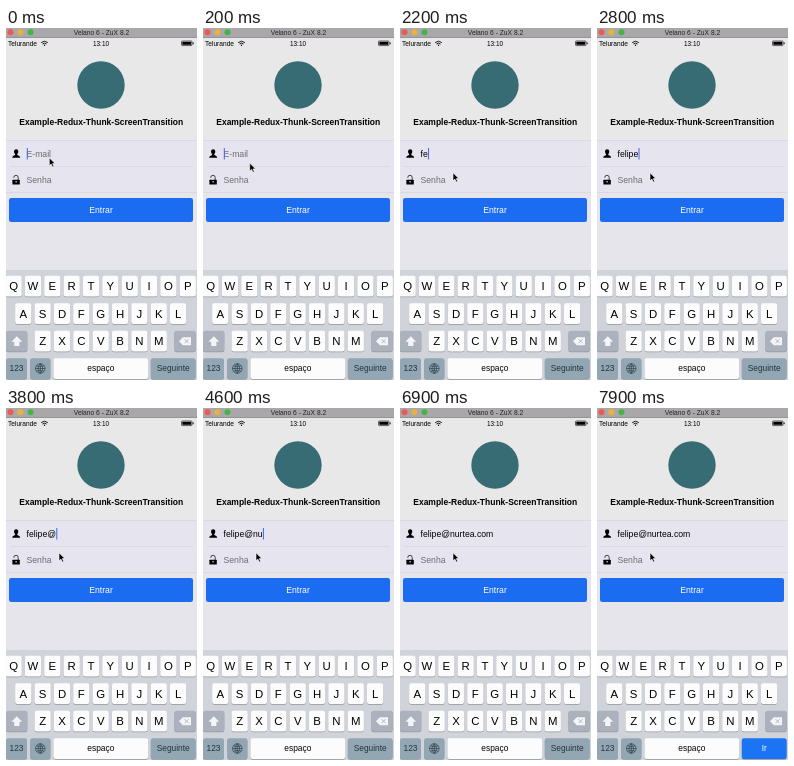
An HTML page for the animation above (8 s loop, 191 by 352 pixels).

```html
<!DOCTYPE html>
<html lang="pt-BR">
<head>
<meta charset="utf-8">
<title>Login</title>
<style>
  html, body { margin: 0; width: 100%; height: 100%; overflow: hidden; background: #e6e5ec; }
  svg { display: block; width: 191px; height: 352px; }
  text { font-family: "Liberation Sans", Arial, sans-serif; font-size: 8.66px; white-space: pre; }
  .mid { text-anchor: middle; }
  .bold { font-weight: bold; }
  .hint { fill: #6c6c70; }
  .key { font-size: 11.4px; }
  .label { font-size: 8.4px; }
</style>
</head>
<body>
<svg viewBox="0 0 191 352">
  <rect width="191" height="352" fill="#e6e5ec"/>
  <rect width="191" height="112" fill="#e8e8e8"/>

  <g id="titlebar">
    <rect width="191" height="10" fill="#aaa7ab"/>
    <rect y="9" width="191" height="1" fill="#969398"/>
    <circle cx="4.5" cy="4.2" r="3" fill="#ee5a52"/>
    <circle cx="14.3" cy="4.2" r="3" fill="#e9b23c"/>
    <circle cx="24.5" cy="4.2" r="3" fill="#43b548"/>
    <text class="mid" x="95.5" y="6.8" style="font-size:6.7px" fill="#252327">Velano 6 - ZuX 8.2</text>
  </g>

  <g id="status">
    <text x="2" y="17.6" style="font-size:6.6px">Telurande</text>
    <g fill="none" stroke="#000" stroke-width=".9">
      <path d="M35.2 14.6q3.3-2.8 6.6 0M36.5 16q2-1.7 4 0"/>
    </g>
    <circle cx="38.5" cy="17.2" r=".7"/>
    <text class="mid" x="95" y="17.6" style="font-size:6.4px">13:10</text>
    <rect x="175.5" y="13" width="10.5" height="4.6" rx=".8" fill="none" stroke="#000" stroke-width=".6"/>
    <rect x="176.3" y="13.8" width="8.9" height="3"/>
    <rect x="186.7" y="14.4" width=".9" height="1.8"/>
  </g>

  <circle cx="95" cy="57" r="23.7" fill="#386c74"/>
  <text class="mid bold" x="95.2" y="97.3" style="font-size:8.5px">Example-Redux-Thunk-ScreenTransition</text>

  <g id="form">
    <rect y="112" width="191" height="52" fill="#e6e4ef"/>
    <path d="M0 112.5H191M4 138.5H187M0 164.5H191" stroke="#dad8e2" stroke-width="1"/>
    <path d="M10.2 121.2c2.7 0 2.5 3.6 1.1 4.8v.9c1.3.7 2.9.9 2.9 2.8H6.2c0-1.9 1.6-2.1 2.9-2.8v-.9c-1.4-1.2-1.6-4.8 1.1-4.8z"/>
    <path d="M7.8 149.9v-.4a2.2 2.2 0 0 1 4.4 0v2.6" fill="none" stroke="#333" stroke-width=".9"/>
    <rect x="6.4" y="151.7" width="7.4" height="4.8" rx=".5"/>
    <circle cx="10.1" cy="153.8" r=".8" fill="#e6e4ef"/>
    <text id="hint" class="hint" x="20.5" y="129.1">E-mail</text>
    <text id="email" x="20.5" y="129.1"></text>
    <text class="hint" x="20.5" y="155.2">Senha</text>
    <rect id="caret" width="1" height="11.5" fill="#4568e6"/>
    <rect x="3" y="170" width="184" height="24" rx="2.2" fill="#1c6cf2"/>
    <text class="mid" x="95" y="185.2" fill="#fff">Entrar</text>
  </g>

  <g id="keyboard"><rect y="242" width="191" height="110" fill="#d0d4da"/></g>

  <path id="mouse" d="M0 0V8L1.9 6.3 3.2 9.2 4.6 8.6 3.3 5.8H5.8Z" stroke="#fff" stroke-width=".6"/>
</svg>

<script>
const $ = id => document.getElementById(id);
const LOOP = 8000, TICK = 100, LEFT = 20.5;
const ADDRESS = "felipe@nurtea.com";

// [time, number of typed characters]
const typed = [[0, 0], [1600, 1], [1700, 2], [2300, 3], [2400, 4], [2700, 5], [2800, 6],
  [3600, 7], [4300, 8], [4600, 9], [4700, 10], [4800, 11], [4900, 12], [5000, 13],
  [5300, 14], [5700, 15], [5800, 16], [5900, 17]];

// [time, caret opacity]
const blink = [[0, 1], [300, .5], [400, 0], [700, .3], [800, .7], [900, 1], [1200, .4],
  [1300, 0], [1600, 1], [3300, .5], [3400, 0], [3600, 1], [6400, .6], [6500, .3],
  [6600, 0], [7100, 1], [7600, .5], [7700, .15], [7900, 0]];

const FOCUS = 7100;
const WHITE = "#fcfcfd", GRAY = "#abb2bd", TEAL = "#92a7b3", INK = "#24343d";

function add(tag, attrs, content = "") {
  const el = document.createElementNS("http://www.w3.org/2000/svg", tag);
  for (const name in attrs) el.setAttribute(name, attrs[name]);
  el.textContent = content;
  return $("keyboard").appendChild(el);
}

const rowY = row => 247.7 + row * 27.5;

function addKey(x, row, width, fill, label = "", cls = "label", ink = "#000") {
  const y = rowY(row), box = { x, width, height: 20.8, rx: 2.2 };
  add("rect", { ...box, y: y + .7, fill: "#92969c" });
  const face = add("rect", { ...box, y, fill });
  const drop = cls === "key" ? 14.6 : 13.2;
  const text = add("text", { x: x + width / 2, y: y + drop, class: "mid " + cls, fill: ink }, label);
  return { face, text };
}

function buildKeyboard() {
  const pitch = 19.35, width = 16.3, center = 94.7;
  ["QWERTYUIOP", "ASDFGHJKL", "ZXCVBNM"].forEach((letters, row) => {
    const start = center - ((letters.length - 1) * pitch + width) / 2;
    [...letters].forEach((c, i) => addKey(start + i * pitch, row, width, WHITE, c, "key"));
  });
  addKey(0, 2, 21.3, GRAY);
  addKey(168.4, 2, 21.3, GRAY);
  addKey(0, 3, 21, TEAL, "123", "label", INK);
  addKey(24.2, 3, 20.2, TEAL);
  addKey(47.4, 3, 94.8, WHITE, "espaço");

  add("path", { d: "M10.8 308.2l5.4 5.6h-2.8v4.2H8.2v-4.2H5.4z", fill: "#f4f5f7" });
  add("path", { d: "M173 313.2l3.8-4h8.2v8h-8.2z", fill: "#f4f5f7" });
  add("path", { d: "M178.6 311.2l4 4m0-4l-4 4", stroke: GRAY, "stroke-width": .9 });
  add("path", {
    d: "M29.5 340.5a4.8 4.8 0 1 0 9.6 0a4.8 4.8 0 1 0-9.6 0h9.6M34.3 335.7v9.6" +
       "M34.3 335.7q-4.8 4.8 0 9.6q4.8-4.8 0-9.6M30.5 337.8q3.8 1.8 7.6 0M30.5 343.2q3.8-1.8 7.6 0",
    fill: "none", stroke: INK, "stroke-width": .6
  });
  return addKey(144.8, 3, 44.8, TEAL, "Seguinte");
}

const enter = buildKeyboard();
const at = (steps, t) => steps.findLast(step => step[0] <= t)[1];

function draw(now) {
  const t = Math.floor(now % LOOP / TICK) * TICK;
  const email = $("email"), caret = $("caret");
  const count = at(typed, t), done = t >= FOCUS;

  email.textContent = ADDRESS.slice(0, count);
  $("hint").style.display = count ? "none" : "";

  const width = count && !done ? email.getComputedTextLength() : 0;
  caret.setAttribute("x", LEFT + .3 + width);
  caret.setAttribute("y", done ? 146 : 120);
  caret.setAttribute("opacity", at(blink, t));

  enter.face.setAttribute("fill", done ? "#1a74f3" : TEAL);
  enter.text.setAttribute("fill", done ? "#fff" : INK);
  enter.text.textContent = done ? "Ir" : "Seguinte";

  const p = Math.min(1, t / 500), ease = p * p * (3 - 2 * p);
  $("mouse").setAttribute("transform", `translate(${43.3 + 9.7 * ease} ${129.8 + 15 * ease})`);
}

const begin = performance.now();
(function frame() {
  draw(performance.now() - begin);
  requestAnimationFrame(frame);
})();
</script>
</body>
</html>
```
